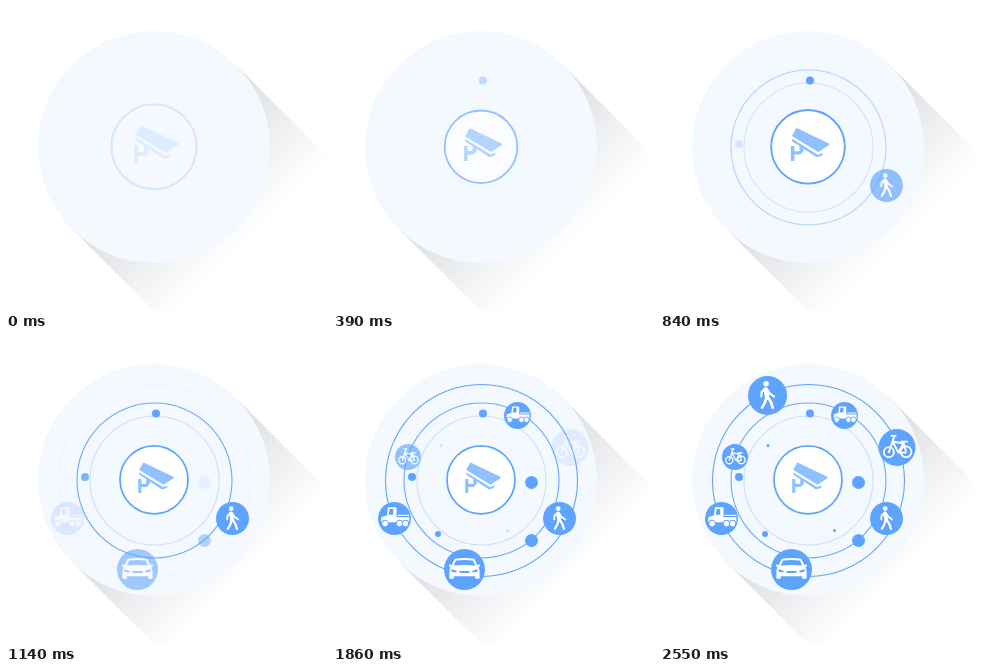
Animation of 321x305 px, one loop 2580 ms. Source, as an HTML page:

```html
<!DOCTYPE html>
<html lang="en">
<head>
<meta charset="utf-8">
<title>Camera radar</title>
<style>
  html, body { margin: 0; width: 100%; height: 100%; overflow: hidden; background: #fff; }
  svg { display: block; width: 321px; height: 305px; }
  .line { fill: none; stroke: #fff; stroke-linecap: round; stroke-linejoin: round; }
</style>
</head>
<body>
<svg viewBox="0 0 321 305">
  <defs>
    <linearGradient id="shade" gradientUnits="userSpaceOnUse" x1="148" y1="141" x2="241" y2="234">
      <stop offset="0" stop-color="#d9dbe1"/>
      <stop offset=".35" stop-color="#e6e7e9"/>
      <stop offset="1" stop-color="#fff"/>
    </linearGradient>

    <!-- icons are drawn around 0,0 for a badge of radius 20 -->
    <g id="walker">
      <circle cx="-1.5" cy="-12" r="2.8" fill="#fff"/>
      <path class="line" stroke-width="4.6" d="M-1.8-6.2 -.3 1.5"/>
      <path class="line" stroke-width="2.2" d="M-2.5-6.8 -6-3.5 -6.4 1M-.5-6.3 2.6-1.8 6.8 1.2"/>
      <path class="line" stroke-width="2.7" d="M-1 2 -2.8 7.5 -5.6 12.4M.3 1.8 3.4 6.5 5.4 12.6"/>
    </g>
    <g id="car">
      <path fill="#fff" fill-rule="evenodd" d="M-9.5-10.5Q0-12 9.5-10.5L12.5-4.5 15-5.2V-3L13.6-2.5Q15 0 14.7 4V9H10.5V6.5H-10.5V9H-14.7V4Q-15 0-13.6-2.5L-15-3V-5.2L-12.5-4.5ZM-8.2-8.7-10.4-3.8Q0-4.8 10.4-3.8L8.2-8.7Q0-9.6-8.2-8.7Z"/>
      <path fill="#5ea4ff" d="M-13-.2-7.5 1.3-8.2 3-12.6 2.3ZM13-.2 7.5 1.3 8.2 3 12.6 2.3ZM-5.5 1.4H5.5L4.3 3.4H-4.3Z"/>
    </g>
    <g id="truck">
      <path fill="#fff" fill-rule="evenodd" d="M-8-13.5H2.5V-1.5H18V4.5H-16V-1.5L-9-4ZM-6-11.5-7-4.5H-1.5V-11.5Z"/>
      <path fill="#fff" d="M4-4.5H18V-3H4Z"/>
      <g fill="#fff" stroke="#5ea4ff" stroke-width="1.3">
        <circle cx="-11.5" cy="6.2" r="4"/>
        <circle cx="6" cy="6.2" r="4"/>
        <circle cx="13.3" cy="6.2" r="4"/>
      </g>
    </g>
    <g id="bike" class="line" stroke-width="2">
      <circle cx="-8.8" cy="5" r="5.4"/>
      <circle cx="9.8" cy="4.6" r="5.8"/>
      <path d="M-8.8 5-3-12M-6-12.6H-1.4M-4.7-6.5 1.5 5.5 7-5 9.8 4.6M1.5 5.5H9M-4.7-6.5 6-4.5M4.5-6.4H11"/>
    </g>
  </defs>

  <path fill="url(#shade)" d="M230 59 400 229 236 393 66 223Z"/>
  <circle cx="148" cy="141" r="116" fill="#f4f8ff"/>
  <g id="scene"></g>
  <g id="hub">
    <circle r="34" fill="#fff" stroke="#5ea4ff" stroke-width="1.7"/>
    <g fill="#8fc0ff">
      <path stroke="#8fc0ff" stroke-width="1.6" stroke-linejoin="round" d="M-10.3-16.4 19-2.3 9.5 4-13.8-10.2Z"/>
      <path d="M-14.6-7.4 9 7.3 13.6 5.6 13 8.2 8 9.7-14.6-5Z"/>
      <path d="M-15.8-.8H-12.6V4H-7.8V-.8L-4.2 1.2V4.2L-7 7.2H-12.6V13.2H-15.8Z"/>
    </g>
  </g>
</svg>
<script>
const LOOP = 2580, FADE = 510, BLUE = '#5ea4ff';
const scene = document.getElementById('scene');
const hub = document.getElementById('hub');

// the clock ticks in holds: [from, hold]
const HOLDS = [[0, 30], [870, 60], [1050, 90], [1140, 60], [1500, 90], [2130, 60], [2190, 90]];
// hub size over time
const PULSE = [[0, 1.25], [300, 1], [630, 1.25], [945, 1], [LOOP, 1]];

// radius, colour, fade start
const RINGS = [[64.5, '#c9e0fc', 420], [77.5, '#69aaff', 600], [96, BLUE, 1110]];
// x, y, radius, fade start
const DOTS = [
  [150, 74.5, 4, 210], [79, 138, 4, 730], [198.5, 201.5, 6.5, 910],
  [198.5, 143.5, 6.5, 1090], [105, 195, 3, 1350],
  [108, 106.5, 1.5, 1720], [174.5, 191.5, 1.5, 1720]
];
// icon, x, y, radius, fade start
const BADGES = [
  ['walker', 226.5, 179.5, 16.5, 500], ['car', 131.5, 230.5, 20.5, 850],
  ['truck', 61.5, 179.5, 16.5, 1050], ['truck', 184.5, 76.5, 13.5, 1340],
  ['bike', 75, 118, 13, 1530], ['bike', 237, 108.5, 18.5, 1800],
  ['walker', 107.5, 56.5, 19.5, 2010]
];

const fades = [];

function add(parent, tag, attrs) {
  const el = document.createElementNS('http://www.w3.org/2000/svg', tag);
  for (const key in attrs) el.setAttribute(key, attrs[key]);
  return parent.appendChild(el);
}

function fadeIn(el, start) {
  fades.push({ el, start });
}

for (const [r, stroke, start] of RINGS)
  fadeIn(add(scene, 'circle', { cx: 148.5, cy: 141.5, r, stroke, fill: 'none', 'stroke-width': 1.1 }), start);

for (const [cx, cy, r, start] of DOTS)
  fadeIn(add(scene, 'circle', { cx, cy, r, fill: BLUE }), start);

for (const [icon, x, y, r, start] of BADGES) {
  const g = add(scene, 'g', { transform: `translate(${x} ${y}) scale(${r / 20})` });
  add(g, 'circle', { r: 20, fill: BLUE });
  add(g, 'use', { href: '#' + icon });
  fadeIn(g, start);
}

const clamp = v => Math.min(1, Math.max(0, v));

function tick(t) {
  const [from, hold] = HOLDS.filter(h => h[0] <= t).pop();
  return from + Math.floor((t - from) / hold) * hold;
}

function track(keys, t) {
  const i = keys.findIndex(k => k[0] > t);
  const [t0, a] = keys[i - 1], [t1, b] = keys[i];
  return a + (b - a) * (t - t0) / (t1 - t0);
}

function draw(time) {
  const t = tick(time % LOOP);
  for (const { el, start } of fades) el.setAttribute('opacity', clamp((t - start) / FADE));
  hub.setAttribute('transform', `translate(148 140.8) scale(${track(PULSE, t)})`);
  hub.setAttribute('opacity', clamp(0.2 + t / 900));
}

const begin = performance.now();
function loop() {
  draw(performance.now() - begin);
  requestAnimationFrame(loop);
}
loop();
</script>
</body>
</html>
```
